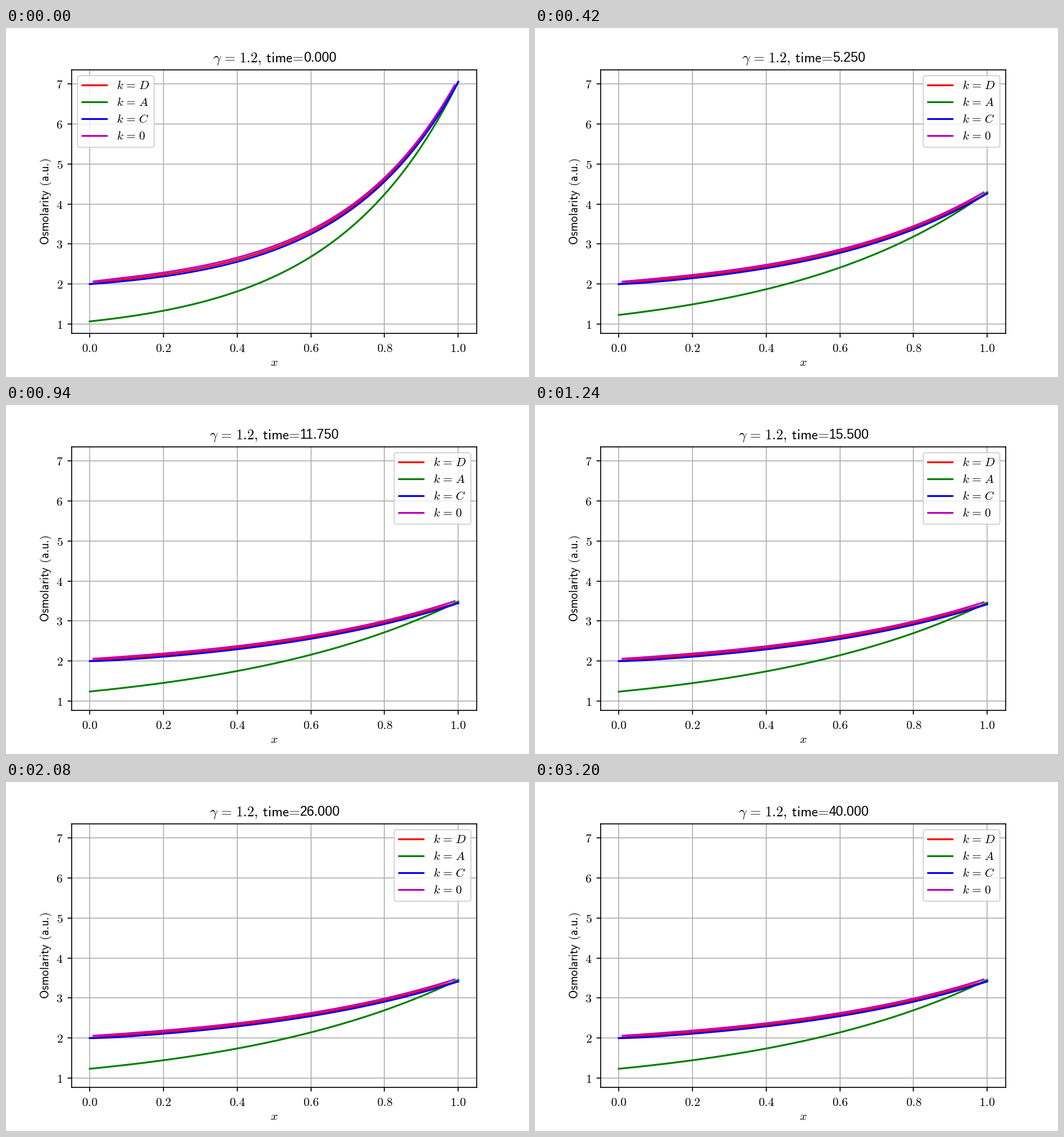
A matplotlib script for the animation above (3.22 s loop, 900 by 600 pixels).

```python
import numpy as np
import matplotlib.pyplot as plt
from matplotlib.animation import FuncAnimation
from matplotlib.patches import FancyBboxPatch

W, H, DPI = 900, 600, 150
FRAMES, STEP = 161, 0.25
LEGEND_X = 122.9
LEGEND_SHIFT = 545.1
SWITCH_TIME = 3.0

plt.rcParams["mathtext.fontset"] = "cm"
plt.rcParams["font.family"] = "DejaVu Sans"

EQ = r"\hspace{0.116}=\hspace{0.116}"
TIGHT_EQ = r"\hspace{-0.2}=\hspace{-0.2}"

fig = plt.figure(figsize=(W / DPI, H / DPI), dpi=DPI, facecolor="white")
ax = fig.add_axes([0.125, 0.125, 0.775, 0.755])
ax.set_xlim(-0.05, 1.05)
ax.set_ylim(0.771, 7.349)
xt = np.linspace(0, 1, 6)
yt = np.arange(1, 8)
ax.set_xticks(xt, [f"${v:.1f}$" for v in xt])
ax.set_yticks(yt, [f"${v}$" for v in yt])
ax.tick_params(axis="x", pad=4)
ax.grid(True)

# Overlay measured in pixels, y pointing down
px = fig.add_axes([0, 0, 1, 1])
px.set_xlim(0, W)
px.set_ylim(H, 0)
px.axis("off")


def label(x, y, s, size=10, **kw):
    kw = {"ha": "left", "va": "baseline", **kw}
    return px.text(x, y, s, fontsize=size, **kw)


label(461.25, 581, "$x$", ha="center")
label(74, 298.5,
      r"$\mathsf{Osmolarity\hspace{0.38}(a.\hspace{-0.2}u.\hspace{-0.2})}$",
      ha="center", rotation=90, rotation_mode="anchor")
title = label(0, 58.5,
              rf"$\gamma{EQ}1.2\mathsf{{,\hspace{{0.18}}time{TIGHT_EQ}}}$",
              11.75, ha="right")
clock = label(0, 58.5, "", 10.8, family="Liberation Sans")

# Curves, in drawing order
x = np.linspace(0, 1, 201)
inner = (x > 0.0099) & (x < 0.9901)
COLORS = {"D": "r", "A": "g", "C": "b", "0": "m"}
curves = {k: ax.plot([], [], color=c, lw=1.5)[0] for k, c in COLORS.items()}

# Legend
frame = FancyBboxPatch((LEGEND_X, 82.4), 131.6, 122.6,
                       boxstyle="round,pad=0,rounding_size=4.17",
                       fc="white", ec="0.8", lw=1, alpha=0.8, snap=True)
px.add_patch(frame)
keys, names = [], []
for row, (k, c) in enumerate(COLORS.items()):
    y = 98.2 + 29 * row
    keys.append(px.plot([0, 0], [y, y], color=c, lw=1.5)[0])
    names.append(label(0, y + 7.2, f"$k{EQ}{k}$"))


def decay(t):
    """Logistic fall from 1 to 0."""
    a = 0.276
    return (1 + a) / (1 + a * np.exp(0.53 * t))


def rise(start, end, rate):
    return start + (end - start) * np.expm1(rate * x) / np.expm1(rate)


def profiles(t):
    s = decay(t)
    left = 1.235 - 0.165 * s + 0.093 * np.sqrt(s) * (1 - s)
    green = rise(left, 3.457 + 3.593 * s, 1.59 + 1.35 * s**1.3)

    dip = 0.02 * (1 - s)
    blue = rise(2, 3.415 + 3.635 * s + dip, 1.7 + 1.5 * s**0.85)
    blue -= dip * (1 - np.exp(-x / 0.037))

    gap = 0.08 + 0.1 * s * x * (1 - x)
    edges = (1 - np.exp(-x / 0.03)) * (1 - np.exp((x - 1) / 0.03))
    red = blue + 0.5 * gap * edges
    magenta = blue + gap * (1 - 0.3 * np.exp(-x / 0.05))
    return {"D": red, "A": green, "C": blue, "0": magenta}


def place_legend(x0):
    frame.set_x(x0)
    for key, name in zip(keys, names):
        key.set_xdata([x0 + 8.3, x0 + 50])
        name.set_x(x0 + 66.7)


def update(i):
    t = i * STEP
    for k, y in profiles(t).items():
        if k == "0":
            curves[k].set_data(x[inner], y[inner])
        else:
            curves[k].set_data(x, y)
    place_legend(LEGEND_X + (LEGEND_SHIFT if t >= SWITCH_TIME else 0))
    split = 511.8 if t < 10 else 505.7
    title.set_x(split)
    clock.set_x(split)
    clock.set_text(f"{t:.3f}")
    return [*curves.values(), frame, *keys, *names, title, clock]


anim = FuncAnimation(fig, update, frames=FRAMES, interval=20,
                     repeat=True, repeat_delay=0, blit=False)
plt.show()
```
